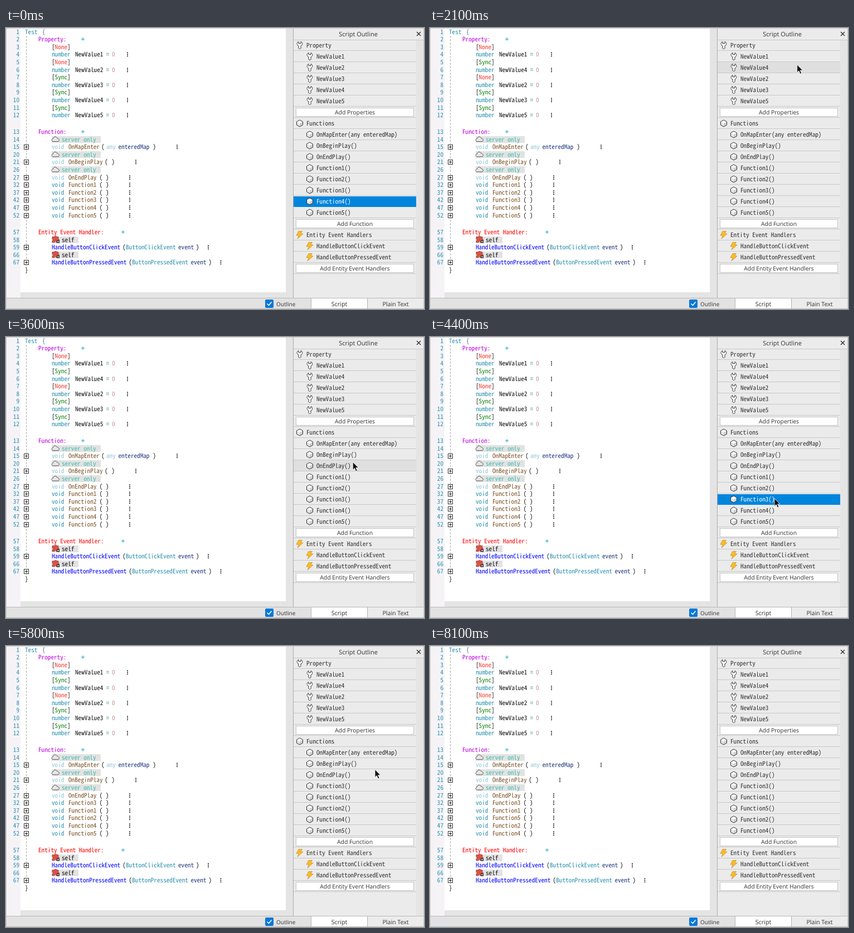
Animation, 750 px wide and 504 px high, one loop 8800 ms. Source, as an HTML page with a canvas:

```html
<!DOCTYPE html>
<html lang="en">
<head>
<meta charset="utf-8">
<title>Script outline</title>
<style>
html, body { margin: 0; width: 100%; height: 100%; overflow: hidden; background: #fff; }
canvas { display: block; }
</style>
</head>
<body>
<canvas id="stage" width="750" height="504"></canvas>
<script>
const g = document.getElementById('stage').getContext('2d');
const LOOP = 8800;
const BLUE = '#0085dc', TEAL = '#2b91af', PALE = '#8cc6d9', BROWN = '#7a5226', NAVY = '#1f377f', INK = '#111';
const UI = '"Open Sans", "Noto Sans", sans-serif';
const MONO = '"Noto Sans Mono CJK KR", "Noto Sans Mono CJK JP", "Noto Sans Mono", monospace';
g.textRendering = 'geometricPrecision';

// Pick the size at which one character advances 5.6 px.
g.font = '100px ' + MONO;
const codeFont = 560 / g.measureText('0').width + 'px ' + MONO;

const WRENCH = new Path2D('M-2-6.5V-3.2H2V-6.5C6-5 5.5 0 2 1V5C2 7-2 7-2 5V1C-5.5 0-6-5-2-6.5Z');
const HEX = new Path2D('M0-6L5.5-3V3L0 6L-5.5 3V-3Z');
const HEX_SIDE = new Path2D('M5.5-3V3L0 6V0Z');
const HEX_FRONT = new Path2D('M-5.5-3L0 0V6L-5.5 3Z');
const BOLT = new Path2D('M-2-6.5H4.5L1.5-2H6L-4 7L-1.5 1H-6Z');
const CLOUD = new Path2D('M-4 4C-8 4-7.5-1-4.5-1C-4-5.5 2-5.5 2.5-2C7-2 7.5 4 4 4Z');
const PUZZLE = new Path2D('M-6-5H-2C-2-7 2-7 2-5H5V-1C7-1 7 2 5 2V5H1C1 3-2 3-2 5H-6V2C-4 2-4-1-6-1Z');
const ARROW = new Path2D('M0 0V14L3.2 11L5.6 16.5L8 15.5L5.6 10.2H10Z');

const PATH = [
  [100, 756, 190], [700, 655, 111], [900, 655, 111], [1300, 655, 61], [1400, 655, 62],
  [1500, 655, 62], [2400, 662, 70], [2600, 662, 70], [2900, 636, 97], [3500, 624, 215],
  [4200, 619, 291], [4300, 619, 291], [4400, 619, 291], [4900, 648, 243], [5700, 648, 243],
  [5800, 663, 223], [6300, 640, 330], [6700, 640, 330], [7000, 643, 298], [7200, 645, 286],
  [7400, 645, 286], [8100, 756, 340]
];
// Row centre, press, first insertion mark, drop
const DRAGS = [[111, 1000, 1400, 1600], [291, 4400, 4600, 5300], [331, 6500, 6900, 7500]];

function cursorAt(t) {
  const i = PATH.findIndex(p => p[0] >= t);
  if (i < 1) return null;
  const [t0, x0, y0] = PATH[i - 1], [t1, x1, y1] = PATH[i];
  const k = (t - t0) / (t1 - t0);
  return { x: x0 + (x1 - x0) * k, y: y0 + (y1 - y0) * k };
}

function box(x, y, w, h, fill) {
  g.fillStyle = fill;
  g.fillRect(x, y, w, h);
}

function code(x, y, str, color, align = 'left') {
  g.font = codeFont;
  g.textAlign = align;
  g.fillStyle = color;
  g.fillText(str, x, Math.round(y + 4));
}

function label(x, y, str, size, align = 'center') {
  g.font = size + 'px ' + UI;
  g.textAlign = align;
  g.fillStyle = '#333';
  g.fillText(str, x, Math.round(y + 4));
}

function shape(path, x, y, fill, line, width = 1) {
  g.save();
  g.translate(x, y);
  g.lineWidth = width;
  g.lineJoin = 'round';
  if (fill) { g.fillStyle = fill; g.fill(path); }
  if (line) { g.strokeStyle = line; g.stroke(path); }
  g.restore();
}

const icons = {
  wrench(x, y) { shape(WRENCH, x, y, '#fff', '#333'); },
  cube(x, y) {
    shape(HEX, x, y, '#fff');
    shape(HEX_FRONT, x, y, '#e6e6e6');
    shape(HEX_SIDE, x, y, '#cfcfcf');
    shape(HEX, x, y, null, '#333');
  },
  bolt(x, y) { shape(BOLT, x, y, '#ffbe1e', '#b9852f', .7); }
};

function dots(x, y) {
  for (const d of [-3.5, -.5, 2.5]) box(x - 1, Math.round(y) + d, 2, 1.6, '#222');
}

function plus(x, y) {
  box(x - 3, y - .5, 6, 1, '#1ba1c4');
  box(x - .5, y - 3, 1, 6, '#1ba1c4');
}

function lineNumber(y, n) {
  code(24, y, n, TEAL, 'right');
}

function expander(y) {
  y = Math.round(y);
  box(32, y - 4, 9, 9, '#333');
  box(33, y - 3, 7, 7, '#fff');
  box(34, y, 5, 1, '#222');
  box(36, y - 2, 1, 5, '#222');
}

function codeView(props, funcs) {
  box(0, 0, 26, 484, '#f6f3f7');
  box(26, 0, 476, 484, '#fff');
  box(26, 474, 489, 10, '#e4e4e4');
  for (let y = 14; y < 428; y += 6) box(36, y, 1, 4, '#aaa');

  const row = (start, i) => start + i * 13.6;
  for (let i = 0; i < 12; i++) lineNumber(row(6.5, i), i + 1);
  code(34, 6.5, 'Test', TEAL);
  code(65, 6.5, '{', '#456e91');
  code(58, 20, 'Property:', '#c000e0');
  plus(138, 20);
  props.forEach((n, i) => {
    const y = row(33.7, i * 2), sync = n > 2;
    code(82, y, '[', INK);
    code(87.6, y, sync ? 'Sync' : 'None', sync ? '#108010' : '#ff3b30');
    code(110, y, ']', INK);
    const v = y + 13.6;
    code(82, v, 'number', TEAL);
    code(124, v, 'NewValue' + n, INK);
    code(179.5, v, '=', '#2e8b7a');
    code(190, v, '0', '#c98c8c');
    dots(218, v);
  });

  [13, 14, 15, 20, 21, 26, 27, 32, 37, 42, 47, 52].forEach((n, i) => lineNumber(row(186, i), n));
  code(58, 186, 'Function:', '#c000e0');
  plus(138, 186);
  const method = (y, name, open, close, more, color) => {
    expander(y);
    code(82, y, 'void', color);
    code(112, y, name, BROWN);
    code(open, y, '(', INK);
    code(close, y, ')', INK);
    dots(more, y);
  };
  [['OnMapEnter', 171, 263.5, 307], ['OnBeginPlay', 177, 189.5, 233], ['OnEndPlay', 167.5, 179, 222]].forEach((m, i) => {
    const y = row(186, 1 + i * 2);
    box(82, Math.round(y) - 6, 88, 12, '#e2e2e2');
    shape(CLOUD, 89, y, '#e6e6e6', '#555');
    code(100, y, 'server only', '#3dbdab');
    method(y + 13.6, ...m, PALE);
  });
  code(180, row(186, 2), 'any', PALE);
  code(201.5, row(186, 2), 'enteredMap', NAVY);
  funcs.forEach((n, i) => method(row(186, 7 + i), 'Function' + n, 167.5, 179, 222, TEAL));

  [57, 58, 59, 66, 67].forEach((n, i) => lineNumber(row(366, i), n));
  code(58, 366, 'Entity Event Handler:', '#ff0000');
  plus(210, 366);
  ['Click', 'Pressed'].forEach((kind, i) => {
    const y = row(366, 1 + i * 2), v = y + 13.6, type = 'Button' + kind + 'Event';
    const shift = i * 11.2;
    box(82, Math.round(y) - 6, 48, 12, '#e2e2e2');
    shape(PUZZLE, 89, y, '#d95347', '#9c2f28', .7);
    box(91, y + 1, 5, 5, '#333');
    box(92.5, y + 2.5, 2, 2, '#fff');
    code(100, y, 'self', INK);
    expander(v);
    code(82, v, 'Handle' + type, '#0000ff');
    code(209 + shift, v, '(', INK);
    code(215 + shift, v, type, TEAL);
    code(309 + shift * 2, v, 'event', NAVY);
    code(341 + shift * 2, v, ')', INK);
    dots(363 + shift * 2, v);
  });
  code(34, 434, '}', INK);
}

function panel(props, funcs, selected, hover, mark) {
  box(502, 0, 13, 484, '#e4e4e4');
  box(515, 0, 235, 484, '#ebebeb');
  box(736, 21, 14, 463, '#e4e4e4');
  box(515, 0, 1, 484, '#aaa');
  label(632, 10.5, 'Script Outline', 11);
  shape(new Path2D('M-3.5-3.5L3.5 3.5M3.5-3.5L-3.5 3.5'), 740.5, 10.5, null, '#222', 1.2);
  box(516, 21, 234, 1, '#c8c8c8');

  let y = 31;
  const section = (title, icon, items, button) => {
    icons[icon](527, y);
    code(539, y, title, '#333');
    box(516, y + 9, 220, 1, '#c8c8c8');
    for (const item of items) {
      y += 20;
      const on = selected.includes(y);
      if (y === hover && !on) box(516, y - 10, 220, 20, '#dfdfdf');
      box(516, y + 9, 220, 1, '#c8c8c8');
      if (on) box(516, y - 9, 220, 19, BLUE);
      icons[icon](545, y);
      code(557, y, item, on ? '#fff' : '#333');
    }
    y += 20;
    box(520, y - 8, 212, 16, '#c4c4c4');
    box(521, y - 7, 210, 14, '#fff');
    label(626, y, button, 10.4);
    box(516, y + 9, 220, 1, '#c8c8c8');
    y += 20;
  };
  section('Property', 'wrench', props.map(n => 'NewValue' + n), 'Add Properties');
  section('Functions', 'cube', ['OnMapEnter(any enteredMap)', 'OnBeginPlay()', 'OnEndPlay()',
    ...funcs.map(n => `Function${n}()`)], 'Add Function');
  section('Entity Event Handlers', 'bolt', ['HandleButtonClickEvent', 'HandleButtonPressedEvent'],
    'Add Entity Event Handlers');
  if (mark) box(516, mark, 220, 2, BLUE);
}

function footer() {
  box(0, 484, 750, 20, '#e2e2e2');
  box(0, 484, 750, 1, '#b8b8b8');
  g.beginPath();
  g.roundRect(465, 487, 15, 15, 2);
  g.fillStyle = '#0078d7';
  g.fill();
  shape(new Path2D('M-4 0L-1 3L4-3'), 472.5, 494.5, null, '#fff', 1.6);
  label(485, 495, 'Outline', 10, 'left');
  box(547, 485, 102, 19, '#b4b4b4');
  box(548, 485, 100, 18, '#fff');
  box(649, 485, 101, 18, '#ececec');
  label(598, 495, 'Script', 10.8);
  label(699, 495, 'Plain Text', 10.6);
  box(0, 503, 750, 1, '#bbb');
  box(0, 0, 750, 1, '#ccc');
  box(0, 0, 1, 504, '#ccc');
  box(749, 0, 1, 504, '#ccc');
}

function draw(t) {
  const props = t < 1600 ? [1, 2, 3, 4, 5] : [1, 4, 2, 3, 5];
  const funcs = t < 5300 ? [1, 2, 3, 4, 5] : t < 7500 ? [3, 1, 2, 4, 5] : [3, 1, 5, 2, 4];
  const pos = cursorAt(t);
  const drag = DRAGS.find(d => t >= d[1] && t < d[3]);
  const selected = t < 1600 ? [311] : [];
  if (drag) selected.push(drag[0]);

  let hover = 0;
  if (pos && pos.x > 516 && pos.x < 736 && (t < 5300 || t > 5800))
    hover = 51 + 20 * Math.floor((pos.y - 41) / 20);
  const mark = drag && t >= drag[2] && hover !== drag[0] ? hover - 10 : 0;

  codeView(props, funcs);
  panel(props, funcs, selected, hover, mark);
  footer();
  if (pos) shape(ARROW, pos.x - 1, pos.y - 1.5, '#111', '#fff', .8);
}

const start = performance.now();
function tick() {
  const t = (performance.now() - start) % LOOP;
  draw(Math.floor(t / 100) * 100);
  requestAnimationFrame(tick);
}
tick();
</script>
</body>
</html>
```
